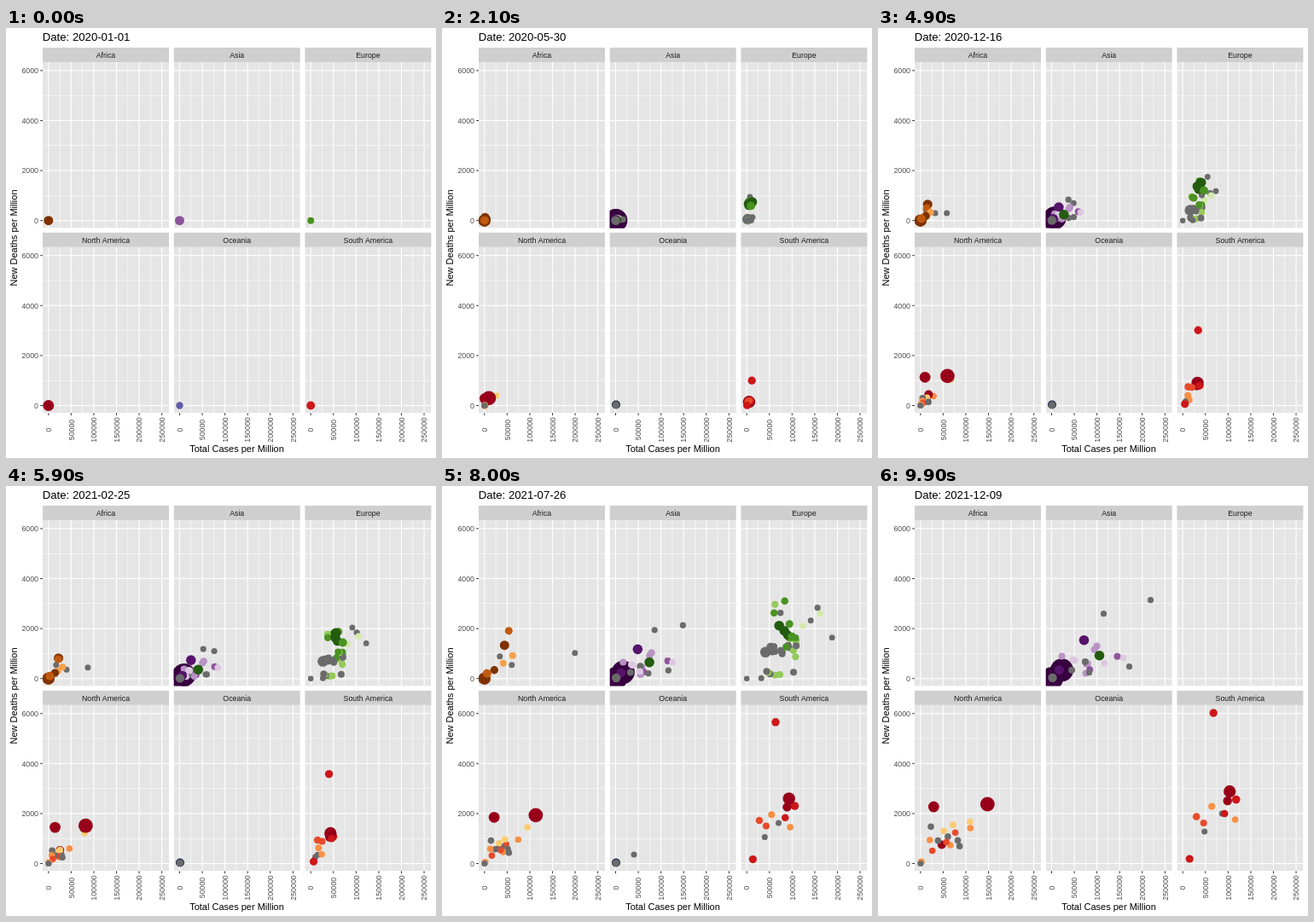
An HTML page with a canvas for the animation above (10 s loop, 504 by 504 pixels).

```html
<!DOCTYPE html>
<html lang="en">
<head>
<meta charset="utf-8">
<title>Cases and deaths by continent</title>
<style>
html, body { margin: 0; width: 504px; height: 504px; overflow: hidden; background: #fff; }
canvas { display: block; }
</style>
</head>
<body>
<canvas id="stage" width="504" height="504"></canvas>
<script>
const ctx = document.getElementById('stage').getContext('2d');
const FONT = '"Liberation Sans", Arial, sans-serif';
const FRAMES = 100, BIRTH = 6, W = 148, H = 194.5;
const ZERO_X = 6.8, ZERO_Y = 185.7, STEP_X = 26.57, STEP_Y = 58.6;
const KEYS = [9, 21, 38, 59, 68, 80, 99];

const grey = '#6b6b6b', navy = '#1c1c4c', blue = '#5e5ea5';
const violet = ['#37003f', '#56146a', '#8d559b', '#b893c4', '#dcc8e0'];
const green = ['#235c0f', '#4a9222', '#94c95a', '#d3eaa8'];
const brown = ['#7f3200', '#c05a10', '#f5a04a'];
const red = ['#98001a', '#cd1719', '#e84a2a', '#f98f45', '#fccb70'];

let seed = 7;
function random(min, max) {
  seed = seed * 16807 % 2147483647;
  return min + (max - min) * seed / 2147483647;
}

// A panel's dots share one pace; each dot bends it with its own exponents.
class Panel {
  constructor(name, index, pace, leadColour, leadRadius) {
    this.name = name;
    this.x = 43 + index % 3 * 153.7;
    this.y = index < 3 ? 40 : 256.8;
    this.pace = [0, ...pace];
    this.end = index % 2 ? FRAMES : FRAMES - 1;
    this.dots = [];
    this.add(leadColour, leadRadius, 0, 0);
    Object.assign(this.dots[0], { birth: 0, end: BIRTH });
  }
  add(colour, r, x, y, bendX = 1, bendY = bendX) {
    this.dots.push({ colour, r, x, y, bendX, bendY, birth: BIRTH, end: this.end });
  }
  cloud(count, colours, r, [minX, maxX], [minY, maxY], bend) {
    for (let i = 0; i < count; i++)
      this.add(colours[i % colours.length], r, random(minX, maxX), random(minY, maxY), bend);
  }
  progress(f) {
    if (f <= KEYS[0]) return 0;
    const i = KEYS.findIndex(key => key >= f);
    const k = (f - KEYS[i - 1]) / (KEYS[i] - KEYS[i - 1]);
    return this.pace[i - 1] + (this.pace[i] - this.pace[i - 1]) * k;
  }
}

const africa = new Panel('Africa', 0, [.03, .2, .5, .6, 1, 1.3], brown[0], 5.5);
const asia = new Panel('Asia', 1, [.01, .08, .35, .5, .68, 1], violet[2], 5.5);
const europe = new Panel('Europe', 2, [.05, .1, .65, .87, 1, 1.4], green[1], 4);
const north = new Panel('North America', 3, [.04, .17, .5, .62, .73, 1], red[0], 6.5);
const oceania = new Panel('Oceania', 4, [0, 0, 0, 0, 1, 1.8], blue, 4.2);
const south = new Panel('South America', 5, [.05, .2, .42, .62, .9, 1], red[1], 5);
const panels = [africa, asia, europe, north, oceania, south];

africa.add(grey, 3.5, 106, 30, 1.2);
africa.add(grey, 3.5, 32, 16, .6);
africa.add(grey, 3.5, 18, 26, 1, .7);
africa.add(brown[0], 5.5, 23.5, 39, 1, .7);
africa.add(brown[1], 4.5, 28.5, 56, 1.3);
africa.add(brown[2], 4, 33, 27);
africa.add(brown[2], 4, 22, 18);
africa.add(brown[0], 4.7, 11.5, 10, .6);
africa.add(brown[0], 7.2, 0, 0);
africa.add(brown[1], 5, 3, 6);

asia.add(violet[0], 13.5, 0, 0);
asia.add(violet[0], 13.5, 12, 10, .8);
asia.add(violet[1], 5.8, 38, 45, 1, .7);
asia.cloud(9, [violet[3], grey, violet[2], violet[4]], 4, [12, 52], [5, 28], .8);
asia.add(grey, 3.6, 61, 76, .75);
asia.add(grey, 3.6, 116, 92);
asia.add(violet[3], 4, 50, 34, .6);
asia.add(violet[3], 4.2, 53, 38, .6);
asia.add(violet[2], 4, 77, 26, .6);
asia.add(violet[4], 3.8, 84, 24, .6);
asia.add(violet[4], 3.8, 62, 18, 2);
asia.add(grey, 3.6, 44, 7, .35);
asia.add(grey, 3.6, 91, 14);
asia.add(green[0], 5.8, 56, 27, .9);
asia.add(violet[1], 5.5, 9, 10);
asia.add(grey, 5.2, 1, 1);

europe.add(grey, 3.4, 75, 68, 1, .3);
europe.add(grey, 3.6, 83, 83);
europe.add(grey, 3.4, 100, 48, 1, .35);
europe.add(green[3], 3.8, 86, 76);
europe.add(green[3], 3.8, 66, 62);
europe.add(green[1], 4.3, 44.5, 91, 1.3);
europe.add(green[2], 4, 33, 87, 1.2);
europe.add(green[1], 4.2, 32, 77, 1.1);
europe.add(grey, 3.7, 39.5, 77, .6, 1);
europe.cloud(18, [grey, green[1], grey, green[2]], 4, [28, 60], [24, 50], 1);
europe.add(green[1], 4.5, 50, 64, 1, .35);
europe.add(green[0], 5.8, 38, 62, .6, .35);
europe.add(green[0], 5.7, 44, 56, 1, .35);
europe.add(green[0], 5.4, 48, 51, 1, .35);
europe.add(green[1], 5, 53, 49, .8, .35);
europe.add(grey, 6.3, 22, 31);
europe.add(grey, 5, 28, 37, 1.2);
europe.cloud(6, [green[2], grey], 4, [5, 60], [2, 14], 1);
europe.add(grey, 3.5, 17, .5, .4);
europe.add(grey, 3.3, 0, 0);

north.add(red[0], 6.4, 15.5, 66.5, 1, .65);
north.add(red[4], 3.8, 58, 49, .45);
north.add(red[0], 8.4, 78.5, 69.5, .85, .65);
north.add(red[3], 3.8, 58.5, 41.5, 1.25);
north.add(red[0], 5, 25, 22, .9, .5);
north.cloud(12, [red[2], grey, red[4], grey, red[3]], 3.8, [8, 46], [12, 50], 1.5);
north.add(red[3], 4, 1, 2);
north.add(grey, 3.6, 0, 0);

oceania.add(navy, 5, .5, 1, 0);
oceania.add(grey, 4.2, .5, .8, 0);
oceania.add(grey, 3.5, 21.5, 10.5);

south.add(red[1], 4.7, 36, 176.5, .6);
south.add(red[1], 4.8, 62.5, 75);
south.add(red[0], 7.2, 55, 84.5);
south.add(red[0], 5.2, 52.5, 73.5);
south.add(grey, 3.5, 46, 58.5, 2);
south.add(red[1], 4.3, 49, 58.5, .8);
south.add(red[2], 4.3, 16, 55, .8);
south.add(red[2], 4, 24.5, 47.5, .7);
south.add(red[3], 4, 34, 67, 1.5);
south.add(red[3], 3.8, 61.5, 51.5, 1.8);
south.add(grey, 3.5, 25.5, 37.5, 1.8);
south.add(red[1], 4.6, 8, 5.5);

function text(str, x, y, size, colour, align = 'center', turned = false) {
  ctx.save();
  ctx.translate(x, y);
  if (turned) ctx.rotate(-Math.PI / 2);
  ctx.font = `${size}px ${FONT}`;
  ctx.fillStyle = colour;
  ctx.textAlign = align;
  ctx.fillText(str, 0, 0);
  ctx.restore();
}

function rect(x, y, w, h, colour) {
  ctx.fillStyle = colour;
  ctx.fillRect(x, y, w, h);
}

function drawPanel(p, f) {
  const x0 = p.x + ZERO_X, y0 = p.y + ZERO_Y, g = p.progress(f);
  rect(p.x, p.y - 17, W, 17, '#cfcfcf');
  text(p.name, p.x + W / 2, p.y - 5.3, 8.8, '#1a1a1a');
  ctx.save();
  ctx.beginPath();
  ctx.rect(p.x, p.y, W, H);
  ctx.clip();
  rect(p.x, p.y, W, H, '#e5e5e5');
  for (let i = 0; i <= 10; i++) {
    const w = i % 2 ? 0.55 : 1.1;
    rect(x0 + i * STEP_X / 2 - w / 2, p.y, w, H, '#fff');
    if (i < 7) rect(p.x, y0 - i * STEP_Y / 2 - w / 2, W, w, '#fff');
  }
  for (const d of p.dots) {
    if (f < d.birth || f >= d.end) continue;
    ctx.fillStyle = d.colour;
    ctx.beginPath();
    ctx.arc(x0 + d.x * g ** d.bendX, y0 - d.y * g ** d.bendY, d.r, 0, 7);
    ctx.fill();
  }
  ctx.restore();
}

function drawAxes() {
  for (const p of [africa, north])
    for (let i = 0; i < 4; i++) {
      const y = p.y + ZERO_Y - i * STEP_Y;
      rect(p.x - 2.8, y - 0.5, 2.8, 1, '#333');
      text(i * 2000, p.x - 5, y + 3.2, 8.8, '#4d4d4d', 'right');
    }
  for (const p of panels.slice(3))
    for (let i = 0; i < 6; i++) {
      const x = p.x + ZERO_X + i * STEP_X;
      rect(x - 0.5, p.y + H, 1, 2.8, '#333');
      text(i * 50000, x + 3.2, 471, 8.8, '#4d4d4d', 'center', true);
    }
  text('Total Cases per Million', 270.5, 497, 11, '#000');
  text('New Deaths per Million', 13, 246, 11, '#000', 'center', true);
}

function draw(now) {
  const f = Math.floor(now / 100) % FRAMES;
  const day = Math.floor(f * 708 / 99);
  const date = new Date(Date.UTC(2020, 0, 1 + day)).toISOString().slice(0, 10);
  rect(0, 0, 504, 504, '#fff');
  text('Date: ' + date, 42.7, 15, 13.2, '#000', 'left');
  panels.forEach(p => drawPanel(p, f));
  drawAxes();
}

function loop() {
  draw(performance.now());
  requestAnimationFrame(loop);
}
loop();
</script>
</body>
</html>
```
